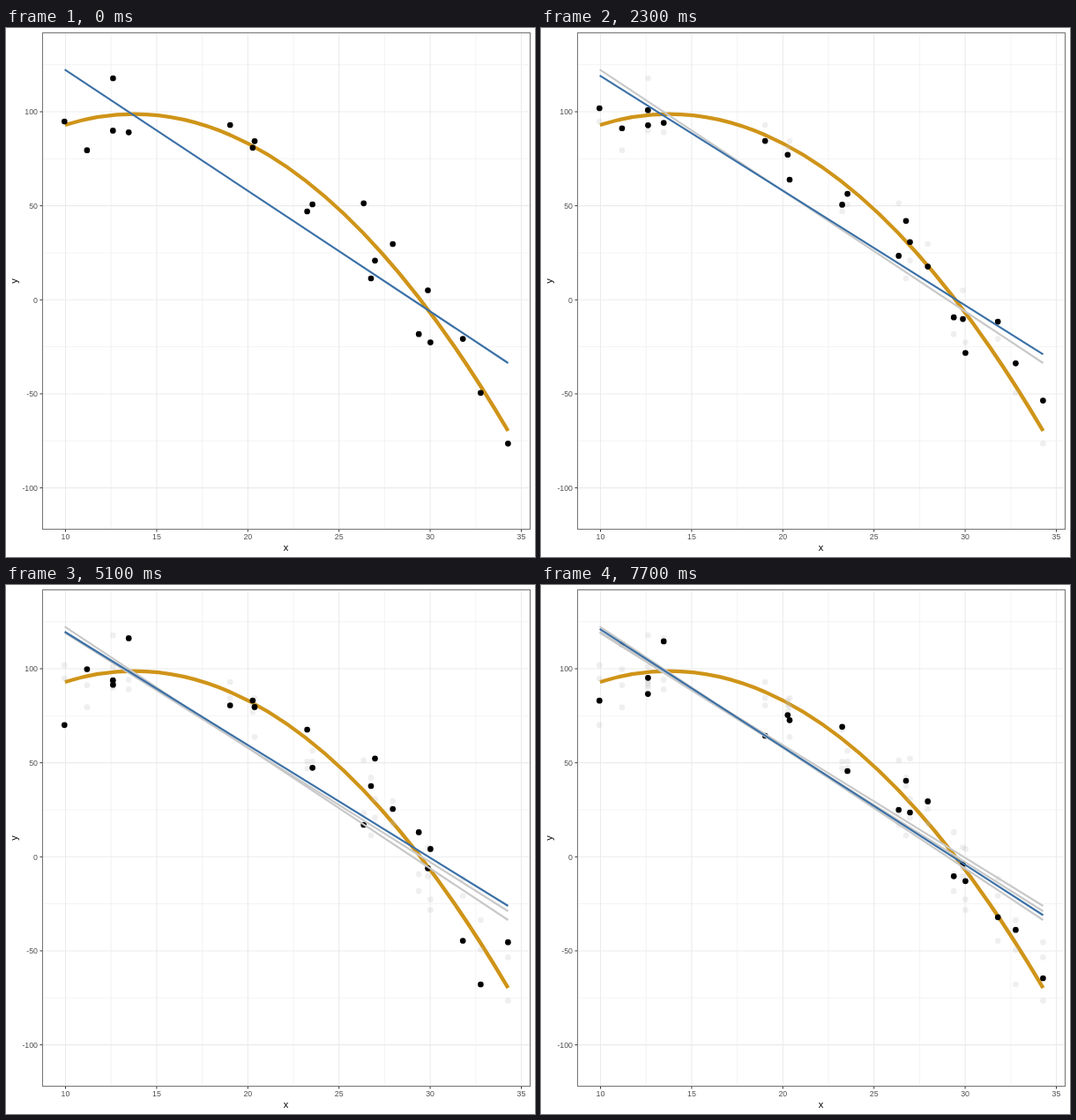
Recreate the animation shown at these times as an HTML page. Size 600x600 px, loop 8000 ms.

```html
<!DOCTYPE html>
<html lang="en">
<head>
<meta charset="utf-8">
<title>Resampled linear fits</title>
<style>
  html, body { margin: 0; width: 100%; height: 100%; overflow: hidden; background: #fff; }
  svg { display: block; width: 100%; height: 100%; }
  text { font-family: "Liberation Sans", Arial, sans-serif; font-size: 8.8px; fill: #4d4d4d; text-anchor: middle; }
  .title { font-size: 11px; fill: #000; }
  .major { stroke: #ebebeb; stroke-width: 1.07; }
  .minor { stroke: #ebebeb; stroke-width: .6; }
  .tick { stroke: #333; stroke-width: 1; }
  .panel { fill: none; stroke: #777; stroke-width: 1.07; }
  .curve { fill: none; stroke: #cf9418; stroke-width: 4.3; }
  .fit { stroke: #3a70a6; stroke-width: 2.13; }
  .oldFit { stroke: #c8c8c8; stroke-width: 2.13; }
  .oldDot { fill: #bebebe; fill-opacity: .25; }
</style>
</head>
<body>
<svg id="plot" viewBox="0 0 600 600"></svg>
<script>
const LOOP = 8000, STEP = 100;
const MOVES = [
  { start: 900, steps: 17 },
  { start: 3500, steps: 16 },
  { start: 6000, steps: 16 }
];
const FIT_X = [66.6, 569.5];
const DOT_X = [66.3, 91.9, 121.4, 121.3, 139.2, 254.2, 279.8, 282, 341.6, 347.6,
  405.7, 414, 418.5, 438.7, 468.2, 478.5, 481.4, 518.2, 538.4, 569.4];
// Heights in stage pixels for each sample, with the ends of its fitted line.
const SAMPLES = [
  { fit: [47.2, 380], dots: [106, 138.7, 57, 116.4, 118.3, 110, 135.8, 128.3, 208, 200,
    198.8, 284, 263.8, 245, 347.2, 297.5, 356.6, 352.6, 413.8, 471.3] },
  { fit: [54, 370], dots: [90.9, 113.6, 110.7, 93, 107.5, 128.2, 143.8, 172.3, 200.4, 188,
    258.8, 218.4, 242.6, 270.7, 328.1, 330.3, 368.6, 332.9, 380.1, 422.3] },
  { fit: [53, 364], dots: [158.8, 95.5, 113.2, 108.2, 60.4, 136.5, 131, 138.4, 164, 207.3,
    272, 228, 196.8, 254, 280.4, 321.3, 299.4, 403.5, 453, 405.2] },
  { fit: [49.8, 374.5], dots: [131.2, 67, 105.3, 123.6, 63.9, 171, 147.6, 153.3, 160.8, 211,
    255, 222, 258, 245.4, 330.3, 316.5, 335.8, 376.8, 391.2, 446] }
];

const plot = document.getElementById('plot');
const px = x => 67.5 + (x - 10) * 20.68;
const py = y => 308.3 - y * 2.133;

function add(tag, attrs, parent = plot) {
  const el = document.createElementNS('http://www.w3.org/2000/svg', tag);
  for (const key in attrs) el.setAttribute(key, attrs[key]);
  return parent.appendChild(el);
}
const line = (cls, x1, y1, x2, y2, parent) => add('line', { class: cls, x1, y1, x2, y2 }, parent);
function label(str, x, y, attrs) {
  add('text', { x, y, ...attrs }).textContent = str;
}
const dot = (cls, i, y, parent) => add('circle', { class: cls, cx: DOT_X[i], cy: y, r: 3.35 }, parent);
const fitLine = (cls, fit, parent) => line(cls, FIT_X[0], fit[0], FIT_X[1], fit[1], parent);

function drawAxes() {
  const column = (cls, x) => line(cls, px(x), 5.5, px(x), 568.5);
  const row = (cls, y) => line(cls, 41.5, py(y), 594.5, py(y));
  for (let x = 12.5; x < 35; x += 5) column('minor', x);
  for (let y = -75; y <= 125; y += 50) row('minor', y);
  for (let x = 10; x <= 35; x += 5) {
    column('major', x);
    line('tick', px(x), 568.5, px(x), 571.5);
    label(x, px(x), 580.2);
  }
  for (let y = -100; y <= 100; y += 50) {
    row('major', y);
    line('tick', 38.5, py(y), 41.5, py(y));
    label(y, 36, py(y) + 3.2, { style: 'text-anchor:end' });
  }
  label('x', 317.5, 593, { class: 'title' });
  label('y', 0, 0, { class: 'title', transform: 'translate(13 287) rotate(-90)' });
}

drawAxes();
add('path', { class: 'curve', d: 'M66.9 110Q318.2 31.2 569.5 457' });
const dotLayer = add('g', {});
const fitLayer = add('g', {});
const past = MOVES.map((move, n) => [
  ...SAMPLES[n].dots.map((y, i) => dot('oldDot', i, y, dotLayer)),
  fitLine('oldFit', SAMPLES[n].fit, fitLayer)
]);
const dots = SAMPLES[0].dots.map((y, i) => dot('dot', i, y, dotLayer));
const fit = fitLine('fit', SAMPLES[0].fit, fitLayer);
add('rect', { class: 'panel', x: 41.5, y: 5.5, width: 553, height: 563 });

const ease = t => t < .5 ? 4 * t ** 3 : 1 - 4 * (1 - t) ** 3;

function render(time) {
  const now = Math.floor(time % LOOP / STEP) * STEP;
  const started = MOVES.filter(move => now >= move.start).length;
  const from = SAMPLES[Math.max(0, started - 1)], to = SAMPLES[started];
  let k = 1;
  if (started) {
    const move = MOVES[started - 1];
    k = ease(Math.min(1, ((now - move.start) / STEP + 1) / move.steps));
  }
  const mix = (a, b) => a + (b - a) * k;
  dots.forEach((el, i) => el.setAttribute('cy', mix(from.dots[i], to.dots[i])));
  fit.setAttribute('y1', mix(from.fit[0], to.fit[0]));
  fit.setAttribute('y2', mix(from.fit[1], to.fit[1]));
  past.forEach((group, n) => group.forEach(el =>
    el.setAttribute('visibility', n < started ? 'visible' : 'hidden')));
}

const origin = performance.now();
function tick() {
  render(performance.now() - origin);
  requestAnimationFrame(tick);
}
tick();
</script>
</body>
</html>
```
